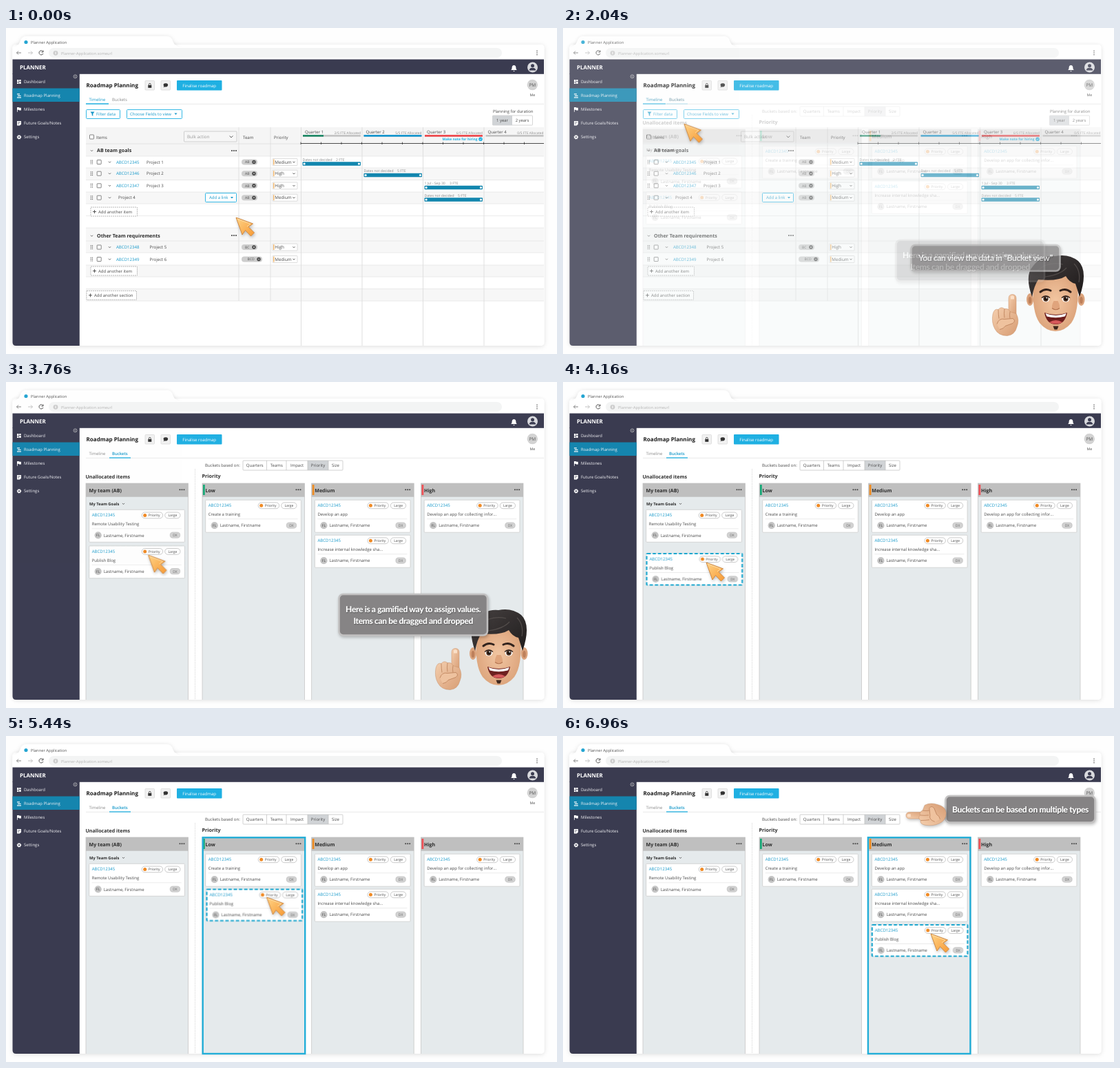
Animation, 800 px wide and 473 px high, one loop 7000 ms. Source, as an HTML page:

```html
<!DOCTYPE html>
<html lang="en">
<head>
<meta charset="utf-8">
<title>Planner</title>
<style>
html, body { margin: 0; width: 100%; height: 100%; overflow: hidden; background: #fefefe; }
svg { display: block; width: 100vw; height: 100vh; font-family: "Open Sans", sans-serif; }
.tip { font-family: Lato, sans-serif; font-weight: 800; font-size: 12.1px; letter-spacing: -.38px; fill: #fff; text-anchor: middle; text-shadow: .5px 1px 1px #555; }
.soft { filter: drop-shadow(1px 2px 2px rgba(0,0,0,.25)); }
.anim { animation: 7s cubic-bezier(.333,0,.667,1) infinite; }
#timeline { animation-name: timeline; }
#buckets { animation-name: buckets; }
#lifted { animation-name: lifted; }
#cursor { animation-name: cursor; }
#drag { animation-name: drag, lifted; }
#low { animation-name: low; }
#medium, #tip3 { animation-name: last; }
#avatar { animation-name: avatar; }
#tip1 { animation-name: tip1; }
#tip2 { animation-name: buckets; }
@keyframes timeline { 0%, 26.14% { opacity: 1 } 36%, 100% { opacity: 0 } }
@keyframes buckets { 0%, 26.14% { opacity: 0 } 36%, 53.29% { opacity: 1 } 59.43%, 100% { opacity: 0 } }
@keyframes lifted { 0%, 53.29% { opacity: 0 } 59.43%, 100% { opacity: 1 } }
@keyframes avatar { 0%, 8.29% { opacity: 0 } 13.71%, 53.29% { opacity: 1 } 59.43%, 100% { opacity: 0 } }
@keyframes tip1 { 0%, 8.29% { opacity: 0 } 13.71%, 26.14% { opacity: 1 } 36%, 100% { opacity: 0 } }
@keyframes low { 0%, 67.14% { opacity: 0 } 72.57%, 79.14% { opacity: 1 } 85.14%, 100% { opacity: 0 } }
@keyframes last { 0%, 79.14% { opacity: 0 } 85.14%, 100% { opacity: 1 } }
@keyframes drag {
  0%, 53.29% { transform: translate(121px,238px) }
  59.43%, 67.14% { transform: translate(121.5px,249px) }
  72.57%, 79.14% { transform: translate(291.5px,222.5px) }
  85.14%, 100% { transform: translate(448.7px,274px) }
}
@keyframes cursor {
  0%, 8.29% { transform: translate(334px,275px) }
  13.71%, 26.14% { transform: translate(167px,107px) }
  36%, 53.29% { transform: translate(206.5px,251px) }
  59.43%, 67.14% { transform: translate(208px,262px) }
  72.57%, 79.14% { transform: translate(378.5px,234px) }
  85.14%, 100% { transform: translate(534px,287px) }
}
</style>
</head>
<body>
<script>
const BLUE = '#1fb0e2', LINK = '#1598c9', NAVY = '#3a3b50', INK = '#484848';

const text = (x, y, s, size = 6, fill = INK, extra = '') =>
  `<text x="${x}" y="${y}" font-size="${size}" fill="${fill}" ${extra}>${s}</text>`;
const bold = (x, y, s, size = 7.1, fill = '#2c2c2c') => text(x, y, s, size, fill, 'font-weight="700"');
const mid = (x, y, s, size = 6, fill = INK) => text(x, y, s, size, fill, 'text-anchor="middle"');
const rect = (x, y, w, h, fill = 'none', stroke = 'none', r = 0, extra = '') =>
  `<rect x="${x}" y="${y}" width="${w}" height="${h}" fill="${fill}" stroke="${stroke}" rx="${r}" ${extra}/>`;
const dot = (x, y, r, fill, extra = '') => `<circle cx="${x}" cy="${y}" r="${r}" fill="${fill}" ${extra}/>`;
const path = (d, fill = 'none', stroke = 'none', w = 1, extra = '') =>
  `<path d="${d}" fill="${fill}" stroke="${stroke}" stroke-width="${w}" ${extra}/>`;
const line = (x1, y1, x2, y2, stroke = '#dcdcdc', w = .7, extra = '') =>
  path(`M${x1} ${y1}L${x2} ${y2}`, 'none', stroke, w, extra);
const chevron = (x, y, stroke = '#555', s = 1.6) =>
  path(`M${x - s} ${y - s / 2}l${s} ${s}l${s} ${-s}`, 'none', stroke, .9);
const triangle = (x, y, fill) => path(`M${x - 2} ${y - 1}h4l-2 2.4z`, fill);
const dots = (x, y) => [0, 3, 6].map(d => dot(x + d, y, 1.05, '#444')).join('');
const layer = (id, content, cls = '') => `<g id="${id}" class="anim ${cls}">${content}</g>`;

function browser() {
  return rect(9.5, 24, 772, 437, '#fff', 'none', 5, 'filter="url(#shadow)"') +
    path('M10 28Q18 27 21 19Q23 12 30 12H233Q240 12 242 19Q245 27 253 28z', '#fff', 'none', 1, 'filter="url(#shadow)"') +
    path('M9.5 28H781V456Q781 461 776 461H14.5Q9.5 461 9.5 456z', '#fff') +
    dot(29, 20.5, 2.6, '#24a5d2') + text(36, 22.8, 'Planner Application', 5.75, '#555') +
    path('M22 36H15.5M18 33.5L15.5 36L18 38.5', 'none', '#777', .9) +
    path('M32 36H38.5M36 33.5L38.5 36L36 38.5', 'none', '#bbb', .9) +
    path('M53.7 34.2A3.1 3.1 0 1 0 54 37M54 32.5V35H51.5', 'none', '#555', 1) +
    rect(62, 29, 658, 14, '#f3f4f4', 'none', 7) +
    dot(72, 36.3, 3.4, '#ccc') + rect(71.5, 34.5, 1, 3.6, '#fff') +
    text(80, 38.5, 'Planner-Application.someurl', 5.6, '#b5b5b5') +
    [33.2, 36, 38.8].map(y => dot(771, y, .8, '#555')).join('') +
    rect(9.5, 45.5, 771.5, 21.3, NAVY) + path('M9.5 66H106.8V461H14.5Q9.5 461 9.5 456z', NAVY) +
    bold(20, 59.8, 'PLANNER', 8, '#fff') +
    path('M733 61Q734.7 60 734.7 57Q734.7 54.3 737.5 54Q740.3 54.3 740.3 57Q740.3 60 742 61zM736.2 62h2.6l-1.3 1.2z', '#fff') +
    dot(764.5, 57, 7.5, '#d9dade') + dot(764.5, 54.7, 2.5, NAVY) + path('M759.7 61.6Q760 57.8 764.5 57.8Q769 57.8 769.3 61.6z', NAVY);
}

function sidebar() {
  const icons = [
    rect(16, 75, 2.5, 3.5, '#fff') + rect(19.2, 75, 2.5, 2, '#fff') + rect(16, 79.2, 2.5, 1.8, '#fff') + rect(19.2, 77.7, 2.5, 3.3, '#fff'),
    [[16, 95.3, 4], [17, 97.8, 4.5], [16, 100.3, 6]].map(([x, y, w]) => rect(x, y, w, 1.2, '#fff')).join(''),
    path('M16 115h3l.6.8h2.4v3.8h-2.8l-.6-.8h-1.8v3h-.8z', '#fff'),
    path('M16 135h6v4.5l-2 2h-4z', '#fff') + path('M17 137h4M17 139h2', 'none', NAVY, .7),
    dot(19, 158.3, 1.9, 'none', 'stroke="#fff" stroke-width="1.5"') + dot(19, 158.3, 2.9, 'none', 'stroke="#fff" stroke-width=".8" stroke-dasharray="1.1 1.2"')
  ];
  return rect(9.5, 87.5, 97.3, 19.5, '#1585ae') +
    dot(100.5, 70.3, 2.5, 'none', 'stroke="#ccc" stroke-width=".7"') + path('M101.6 69L99.6 70.3L101.6 71.6', 'none', '#ccc', .6) +
    ['Dashboard', 'Roadmap Planning', 'Milestones', 'Future Goals/Notes', 'Settings']
      .map((s, i) => text(26, 80.4 + 20 * i, s, 6, '#f2f2f5') + icons[i]).join('');
}

function frame(tab) {
  const [x1, x2] = tab ? [150, 181] : [116, 149];
  return browser() + sidebar() +
    bold(116.5, 85.6, 'Roadmap Planning', 8.05, '#1c1c1c') +
    rect(202, 76.5, 13.5, 13.5, '#f1f1f1', '#d6d6d6', 1, 'stroke-width=".7"') +
    rect(206.3, 83, 5, 3.8, '#333') + path('M207.4 83v-1.2a1.4 1.4 0 0 1 2.8 0v1.2', 'none', '#333', .8) +
    rect(225, 76.5, 13.5, 13.5, '#f1f1f1', '#d6d6d6', 1, 'stroke-width=".7"') +
    path('M228.5 82.7a3.3 2.6 0 1 1 2.2 2.6l-2 .9.6-1.7z', '#333') +
    rect(248, 76, 65.5, 14.6, BLUE, 'none', 1) + mid(280.7, 85.5, 'Finalise roadmap', 6.1, '#fff') +
    dot(764.3, 82.5, 7.7, '#d3d3d3') + mid(764.3, 84.9, 'PM', 6.5, '#555') + mid(764.3, 98.5, 'Me', 5.2) +
    text(120.5, 105.8, 'Timeline', 6, tab ? '#888' : LINK) + text(154, 105.8, 'Buckets', 6, tab ? LINK : '#888', tab ? 'font-weight="600"' : '') +
    line(116, 110.3, 781, 110.3, '#dedede') + line(x1, 110, x2, 110, BLUE, 1.3);
}

const outline = (x, y, w, h = 13) => rect(x, y, w, h, '#fff', BLUE, 1, 'stroke-width=".9"');
const addButton = (x, y, w, s) => rect(x, y, w, 13, '#fff', '#888', .5, 'stroke-width=".7" stroke-dasharray="1.7 1.2"') +
  path(`M${x + 3} ${y + 6.5}h5m-2.5-2.5v5`, 'none', '#333', .8) + text(x + 11, y + 8.7, s, 6);
const checkbox = (x, y) => rect(x, y, 6, 6, '#fff', '#666', .5, 'stroke-width=".8"');

function project(y, id, name, nameX, team, level) {
  const wide = team.length > 2 ? 7 : 0;
  const clearX = 360 + wide;
  let grip = '';
  for (let i = 0; i < 6; i++) grip += dot(123.3 + i % 2 * 2.2, y - 2.3 + (i >> 1) * 2.3, .65, '#555');
  return grip + checkbox(132.2, y - 3) + chevron(150.5, y) + (id && text(160, y + 2.2, id, 6.1, LINK)) +
    text(nameX, y + 2.2, name, 6.1) +
    rect(342, y - 4, 23 + wide, 8, '#cdcdcd', 'none', 4) + text(347 + wide / 2, y + 1.9, team, 5, '#555') +
    dot(clearX, y, 2.7, '#444') + path(`M${clearX - 1} ${y - 1}l2 2m0-2l-2 2`, 'none', '#fff', .6) +
    rect(387, y - 5, 36, 10, '#fff', '#cfcfcf', .7, 'stroke-width=".7"') + rect(388.3, y - 4, 1.1, 8, '#f0a13c') +
    text(390.3, y + 2.2, level, 6.3) + chevron(418, y, '#444', 1.5);
}

function task(x, y, label, fte, fteX) {
  return text(x, y - 4.2, label, 5.1, '#888') + text(fteX, y - 4.2, fte, 5.1, '#888') +
    rect(x, y - 2.7, 84.5, 5.4, '#1286ae', 'none', 1) +
    dot(x + 2.6, y, 1.6, '#fff') + dot(x + 82, y, 1.6, '#fff');
}

function timeline() {
  const quarters = [[431, 30, '#218a68', '2/5'], [519.5, 84, '#1797cf', '5/5'], [608, 84, '#ef4b4f', '6/5'], [696.5, 0, '#bbb', '0/5']];
  const rows = [186, 203, 220.5, 238, 255, 272.5, 290, 309, 326, 344, 361, 378.5, 396];
  let ticks = '';
  for (let x = 428; x <= 781; x += 29.5) ticks += line(x, 165.5, x, 169, '#222', .7);
  return frame(0) +
    outline(116.5, 118.5, 49) + path('M122.5 121.5h6l-2.2 3v3.2l-1.6-.9v-2.3z', LINK) + text(131, 127, 'Filter data', 6, LINK) +
    outline(175.5, 118.5, 80) + text(180, 127, 'Choose Fields to view', 6, LINK) + triangle(246.5, 124.5, LINK) +
    text(707, 122.5, 'Planning for duration', 5.9) +
    rect(706.5, 127, 58, 14, '#fff', '#c5c5c5', 1, 'stroke-width=".7"') + rect(706.5, 127, 28.5, 14, '#d0d3d6') +
    mid(720.5, 136.2, '1 year', 5.9) + mid(749.5, 136.2, '2 years', 5.9) +
    rect(116, 144, 665, 42, '#f5f5f5') +
    [[203, 17.5], [238, 17], [290, 19], [309, 17], [344, 17], [378.5, 17.5]].map(([y, h]) => rect(116, y, 665, h, '#f7f7f7')).join('') +
    rows.map(y => line(116, y, 781, y, '#e3e3e3', .7)).join('') + line(116, 168, 428, 168, '#dadada') +
    [338, 384].map(x => line(x, 144, x, 396, '#dcdcdc', .8)).join('') +
    [428.5, 517, 605.5, 694].map(x => line(x, 144, x, 461, '#dcdcdc', .9)).join('') +
    checkbox(121.5, 155) + text(131, 160.5, 'Items', 6.1) +
    rect(258.5, 150, 76.5, 15, '#f6f6f6', '#c5c5c5', .7, 'stroke-width=".8"') + text(263, 160, 'Bulk action', 6.3, '#999') + chevron(327, 157.7, '#444', 2.4) +
    text(344, 160.5, 'Team', 6.1) + text(389, 160.5, 'Priority', 6.1) +
    quarters.map(([x, w, color, used], i) => rect(x, 155, 84, 2.7, '#c4c4c4') + rect(x, 155, w, 2.7, color) +
      text(x + 3, 153, 'Quarter ' + (i + 1), 6) + text(x + 84, 153.5, used + ' FTE Allocated', 4.8, '#888', 'text-anchor="end"')).join('') +
    bold(633.5, 163.3, 'Make note for hiring', 5, BLUE) + dot(689, 161.3, 2.8, BLUE) + path('M687.6 161.4l1 1l1.7-2', 'none', '#fff', .7) +
    line(428, 167.5, 781, 167.5, '#222', .8) + ticks +
    chevron(124.5, 178) + bold(132, 180.1, 'AB team goals') + dots(328, 178) +
    chevron(124.5, 301.5) + bold(132, 303.8, 'Other Team requirements') + dots(328, 301) +
    project(194.5, 'ABCD12345', 'Project 1', 204, 'AB', 'Medium') +
    project(211.2, 'ABCD12346', 'Project 2', 204, 'AB', 'High') +
    project(228.8, 'ABCD12347', 'Project 3', 204, 'AB', 'High') +
    project(246.2, '', 'Project 4', 163, 'AB', 'Medium') +
    outline(289.5, 239.5, 45) + text(295, 248.4, 'Add a link', 6, LINK) + triangle(328, 246, LINK) +
    project(318, 'ABCD12348', 'Project 5', 208.5, 'BC', 'High') +
    project(335.5, 'ABCD12349', 'Project 6', 208.5, 'BCD', 'Medium') +
    addButton(123, 260, 67.5, 'Add another item') + addButton(123, 346, 67.5, 'Add another item') +
    addButton(117, 381.3, 72.5, 'Add another section') +
    task(430.5, 197, 'Dates not decided', '2 FTE', 479) + task(519.5, 213.5, 'Dates not decided', '5 FTE', 568) +
    task(607.5, 231.5, '1 Jul - Sep 30', '3 FTE', 644) + task(607.5, 249, 'Dates not decided', '5 FTE', 656);
}

function card(x, y, title, dashed) {
  const border = dashed ? 'stroke-width="2.2" stroke-dasharray="5 2.6"' : 'stroke-width=".7"';
  return `<g transform="translate(${x} ${y})">` +
    rect(0, 0, 138.7, dashed ? 45.5 : 47, '#fff', dashed ? '#1ca6ce' : '#c8c8c8', 1, border) +
    text(4, 10.2, 'ABCD12345', 6.1, LINK) +
    rect(76.5, 3.7, 30.5, 8.8, '#fff', '#b5b5b5', 4.4, 'stroke-width=".7"') + dot(81, 8.1, 2.5, '#f08a24') + text(86, 10, 'Priority', 5) +
    rect(110, 3.7, 22.3, 8.8, '#fff', '#b5b5b5', 4.4, 'stroke-width=".7"') + mid(121.2, 10, 'Large', 5) +
    text(4, 23, title, 6) + line(4, 27.5, 134, 27.5, '#dedede', .6) +
    dot(13, 37, 5.1, '#c4c4c4') + mid(13, 39, 'FL', 5.2, '#444') + text(21, 39.3, 'Lastname, Firstname', 6.05) +
    rect(117.5, 32.7, 14.5, 8.3, '#d2d2d2', '#b8b8b8', 4.1, 'stroke-width=".6"') + mid(124.7, 38.8, 'DX', 5, '#666') + '</g>';
}

function column(x, title, color, cards) {
  return rect(x, 147, 148.5, 316, '#e5eaec', '#c8c8c8', 0, 'stroke-width=".8"') + rect(x, 147, 148.5, 19.7, '#bfbfbf') +
    (color ? rect(x + 1, 149, 2.8, 15, color) : '') + bold(x + 4.5, 159.6, title) + dots(x + 136.5, 156.2) +
    cards.map((s, i) => card(x + 4.7, (color ? 171.2 : 185.3) + i * (color ? 51 : 52.5), s)).join('');
}

function buckets(unassigned) {
  const stops = [344, 378.5, 407, 438, 468, 489];
  return frame(1) + '<g clip-path="url(#page)">' +
    text(289, 123.3, 'Buckets based on:', 6) + rect(438, 114, 30, 14, '#d0d3d6') +
    rect(344, 114, 145, 14, 'none', '#bdbdbd', 1, 'stroke-width=".7"') +
    ['Quarters', 'Teams', 'Impact', 'Priority', 'Size'].map((s, i) =>
      mid((stops[i] + stops[i + 1]) / 2, 123.3, s, 6) + (i ? line(stops[i], 114, stops[i], 128, '#bdbdbd') : '')).join('') +
    bold(115.5, 140.4, 'Unallocated items') + bold(284.5, 139, 'Priority', 7.2) +
    line(274.5, 126, 274.5, 461, '#cfcfcf', .7, 'stroke-dasharray="1.5 1"') +
    column(116, 'My team (AB)', '', unassigned) + bold(121, 178.8, 'My Team Goals', 5.8) + chevron(170.5, 176.7) +
    column(285, 'Low', '#18a877', ['Create a training']) +
    column(443.7, 'Medium', '#ef8c22', ['Develop an app', 'Increase internal knowledge sha...']) +
    column(602.5, 'High', '#ee4f55', ['Develop an app for collecting infor...']) + '</g>';
}

const highlight = x => rect(x, 147.3, 148.5, 313.7, 'none', '#22aed8', 0, 'stroke-width="2.4"');

const bubble = (x, y, w, h, lines) => `<g class="soft">${rect(x, y, w, h, '#858384', '#c2c1c1', 6, 'stroke-width="2.6"')}</g>` +
  lines.map((s, i) => `<text class="tip" x="${x + w / 2}" y="${y + h / 2 + 4.5 + (i - (lines.length - 1) / 2) * 17}">${s}</text>`).join('');

function face() {
  const ear = x => `<ellipse cx="${x}" cy="394" rx="5" ry="9" fill="#dba27b"/><ellipse cx="${x}" cy="395" rx="2.3" ry="5" fill="#bd7f59"/>`;
  const eye = x => `<ellipse cx="${x}" cy="393" rx="5.5" ry="4.5" fill="#fff"/>` + dot(x, 393, 3.7, '#4a2c1c') + dot(x, 393, 2, '#15100d') + dot(x + 1.2, 391.5, .9, '#fff') +
    path(`M${x - 6} 391.5Q${x} 386 ${x + 6} 391.5`, 'none', '#2a1a14', 1.4);
  return ear(678) + ear(752.5) +
    path('M683 368Q680 411 692 428Q702 440 715 440Q728 440 738 428Q750 411 747 368Q732 350 700 353z', 'url(#face)') +
    path('M681 390Q670 359 682 346Q694 329 715 331Q734 327 748 338Q763 352 750 390Q747 380 744 371Q735 369 730 360Q718 368 690 365Q684 374 681 390z', 'url(#hair)') +
    path('M689 352Q704 338 726 343M700 361Q722 358 731 348M742 342Q752 352 749 369', 'none', '#514b49', 1.2) +
    path('M693 383Q700 377 708 381M722 381Q730 377 737 383', 'none', '#30201a', 3, 'stroke-linecap="round"') +
    eye(701) + eye(730) +
    path('M712.5 396Q708 405 711 407.5Q715.5 410 720 407.5Q723 405 718.5 396', '#e0a47c') + path('M710 406.5Q715.5 411 721 406.5', 'none', '#b47550', 1.2) +
    path('M699 413Q715.5 419 732 413Q729 430 715.5 430Q702 430 699 413z', '#6d1e1d') +
    path('M700.5 414Q715.5 420 730.5 414Q730 417 728.5 418.5Q715 422 702.5 418.5z', '#fff') +
    path('M706 427Q715.5 421 725 427Q715.5 432 706 427z', '#d6585a') +
    path('M711.5 432.5h8l-2 5h-4z', '#3b241b');
}

// Upright hand; fingerX places the extended index finger.
const hand = fingerX => path(`M${fingerX} 32V6q0-6 5.5-6q5.5 0 5.5 6V32z`, 'url(#skin)', '#c98e66', .5) +
  path('M2 29Q4 20 10 22Q14 17 19 21Q25 20 27 25L36 28Q41 37 37 47Q34 59 23 60Q10 60 5 50Q0 41 2 29z', 'url(#skin)', '#c48a63', .5) +
  path('M10 22Q10 29 11 35M19 21Q18 28 19 34M27 25Q26 30 27 35', 'none', '#b97d56', .8) +
  path('M8 43Q11 34 19 36L31 35Q36 38 31 42L20 46Q18 50 12 51', '#efc29e', '#b97d56', .8) +
  path(`M${fingerX + 3} 3q2.5-2.5 5 0v4h-5z`, '#fbe0c8');

const cursor = path('M0 0L24.5 9L18 13.5L26.5 22L21.5 27L13.5 18.5L9 25z', 'url(#orange)', '#cf8840', 1, 'stroke-linejoin="round"') +
  path('M2 2L21 9.2L16 13', 'none', '#ffe6b5', .8);

const stops = (from, to) => `<stop stop-color="${from}"/><stop offset="1" stop-color="${to}"/>`;
const gradient = (id, from, to) => `<linearGradient id="${id}" x2="1" y2="1">${stops(from, to)}</linearGradient>`;

document.body.innerHTML = `<svg viewBox="0 0 800 473" text-rendering="geometricPrecision">
  <defs>
    ${gradient('skin', '#f5cfae', '#d79c73')}${gradient('hair', '#454040', '#1d1919')}${gradient('orange', '#ffd488', '#f79a35')}
    <radialGradient id="face" r=".6">${stops('#f3c6a1', '#d99f76')}</radialGradient>
    <filter id="shadow" x="-5%" y="-20%" width="110%" height="140%"><feDropShadow dx="0" dy="1" stdDeviation="3" flood-opacity=".13"/></filter>
    <clipPath id="page">${rect(106, 111, 675, 350)}</clipPath>
  </defs>` +
  layer('timeline', timeline()) +
  layer('buckets', buckets(['Remote Usability Testing', 'Publish Blog'])) +
  layer('lifted', buckets(['Remote Usability Testing'])) +
  layer('low', highlight(285.7)) + layer('medium', highlight(442.9)) +
  layer('drag', card(0, 0, 'Publish Blog', true)) +
  layer('tip3', bubble(555.5, 87, 217, 38.5, ['Buckets can be based on multiple types']) +
    '<g class="soft"><g transform="translate(498 131) rotate(-90) scale(.85 .97)">' + hand(13) + '</g></g>') +
  layer('avatar', face() + `<g transform="translate(622 386.5)">${hand(25)}</g>`) +
  layer('tip1', bubble(505.5, 315, 216, 37.5, ['You can view the data in “Bucket view”'])) +
  layer('tip2', bubble(483.5, 308, 215.5, 59.5, ['Here is a gamified way to assign values.', 'Items can be dragged and dropped'])) +
  layer('cursor', cursor, 'soft') + '</svg>';
</script>
</body>
</html>
```
